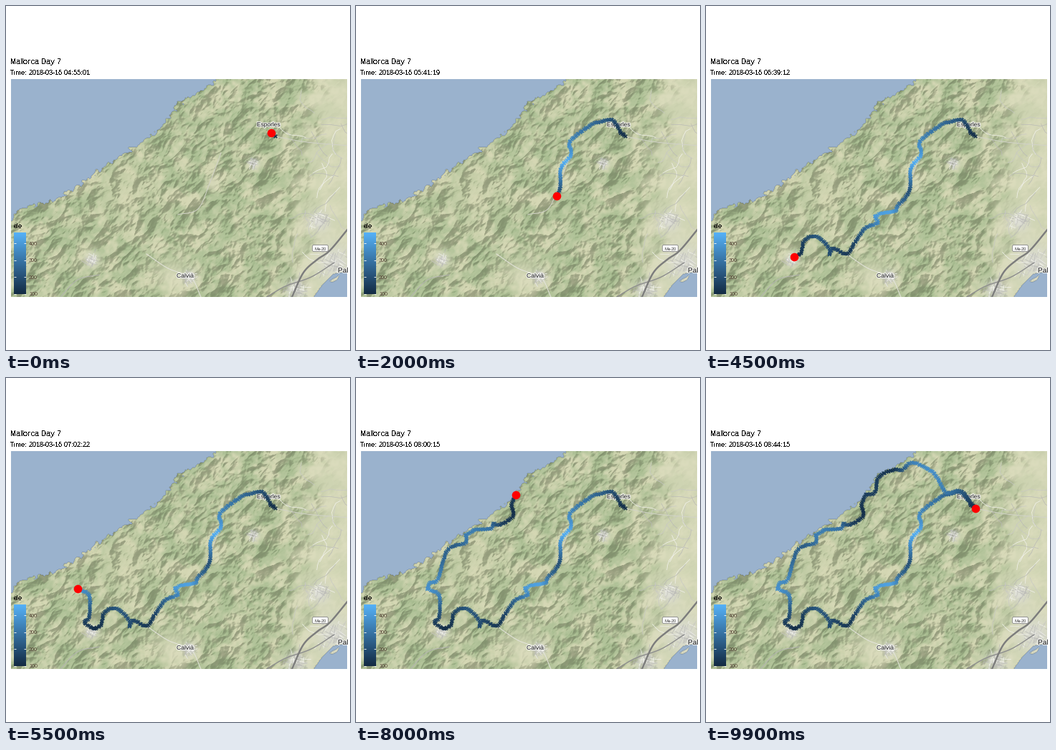
Write a matplotlib script that moves like this. It is 480 px wide and 480 px high and loops after 10 s.

```python
import matplotlib.pyplot as plt
import numpy as np
from matplotlib import patheffects
from matplotlib.animation import FuncAnimation
from matplotlib.collections import LineCollection
from matplotlib.colors import LinearSegmentedColormap
from matplotlib.patches import FancyBboxPatch, Rectangle
from matplotlib.path import Path

FRAMES, INTERVAL = 100, 100
PT = 0.9  # points per pixel at 80 dpi
LEFT, RIGHT, TOP, BOTTOM = 7, 476, 102, 406
START, DURATION = 4 * 3600 + 55 * 60 + 1, 13754
EFFORT = 0.07  # how strongly a climb slows the rider

rng = np.random.default_rng(16)
X, Y = np.meshgrid(np.arange(LEFT, RIGHT) + 0.5, np.arange(TOP, BOTTOM) + 0.5)

COAST = [(0, 308), (22, 281), (66, 272), (104, 249), (130, 229), (170, 203), (200, 184),
         (223, 162), (240, 136), (275, 117), (297, 101), (297, 60), (0, 60)]
BAY = [(425, 412), (440, 391), (457, 374), (485, 368), (485, 412)]
SPIT = [(451, 384), (465, 376), (462, 382), (456, 385)]
VALLEYS = [(232, 374, 28), (120, 354, 15), (288, 248, 10)]
TOWNS = [(458, 358, 24), (437, 300, 14), (120, 354, 8), (346, 219, 7), (256, 378, 9),
         (405, 397, 15)]


def spline(points, step=2.2):
    """Smooth curve through the points, resampled at an even spacing."""
    p = np.array(points, float)
    p = np.vstack([2 * p[0] - p[1], p, 2 * p[-1] - p[-2]])
    u = np.linspace(0, 1, 20)[:, None]
    xy = np.vstack([
        b + u / 2 * (c - a + u * (2 * a - 5 * b + 4 * c - d + u * (3 * (b - c) + d - a)))
        for a, b, c, d in zip(p, p[1:], p[2:], p[3:])])
    s = np.r_[0, np.cumsum(np.hypot(*np.diff(xy, axis=0).T))]
    v = np.linspace(0, s[-1], max(round(s[-1] / step), 2) + 1)
    return np.c_[np.interp(v, s, xy[:, 0]), np.interp(v, s, xy[:, 1])]


# Terrain

def field(wavelength, stretch=1.0):
    """Random waves of one scale, drawn out along the south-west to north-east axis."""
    h, w = X.shape
    fy, fx = np.fft.fftfreq(h)[:, None], np.fft.rfftfreq(w)[None]
    f = np.hypot((fx - fy) * stretch, fx + fy) / np.sqrt(2)
    gain = np.exp(-2 * np.log(np.maximum(f, 1e-4) * wavelength) ** 2)
    n = np.fft.irfft2(np.fft.rfft2(rng.normal(size=X.shape)) * gain, s=X.shape)
    return n / n.std()


def blobs(spots):
    total = sum(np.exp(-((X - x) ** 2 + (Y - y) ** 2) / r ** 2) for x, y, r in spots)
    return np.clip(total, 0, 1)


def inside(poly, x, y):
    return Path(poly).contains_points(np.c_[x.ravel(), y.ravel()]).reshape(x.shape)


def mix(base, color, amount):
    return base + (np.array(color) - base) * amount[..., None]


def terrain():
    plain = 1 / (1 + np.exp(-(X + 0.1 * (Y - 250) - 412 + 9 * field(50)) / 9))
    flat = np.clip(plain + blobs(VALLEYS), 0, 1)

    height = sum(-a * np.abs(field(w, 1.3))
                 for w, a in [(80, 1.0), (40, 0.55), (20, 0.26), (10, 0.09)])
    gy, gx = np.gradient(height)
    slope = gx + gy
    slope = np.tanh(slope / slope.std()) * (1 - 0.95 * flat)

    trees = np.clip(0.6 + 0.35 * field(60) + 0.15 * field(15), 0, 1) * (1 - 0.8 * flat)
    trees *= 1 - 0.7 * blobs([(165, 260, 40)])
    rgb = np.ones(X.shape + (3,)) * (209, 212, 176)
    rgb = mix(rgb, (219, 220, 189), flat)
    rgb = mix(rgb, (166, 187, 143), trees)
    rgb = mix(rgb, (222, 222, 217), 0.85 * blobs(TOWNS))
    rgb = mix(rgb, (88, 96, 72), 0.45 * np.clip(-slope, 0, 1))
    rgb = mix(rgb, (232, 232, 202), 0.22 * np.clip(slope, 0, 1))

    sea = inside(COAST, X + 1.6 * field(12), Y + 1.6 * field(12)) | inside(BAY, X, Y)
    sea &= ~inside(SPIT, X, Y)
    rgb[sea] = (154, 178, 205)
    edge = np.hypot(*np.gradient(sea.astype(float))) > 0
    rgb[edge] *= 0.9
    return np.clip(rgb, 0, 255).astype(np.uint8), sea


def streets():
    """Short crossing lanes in each town and long wandering ones over the plain."""
    lanes = []
    for cx, cy, r in TOWNS:
        tilt = rng.uniform(0, np.pi)
        for _ in range(int(r * 3)):
            a = tilt + rng.integers(2) * np.pi / 2 + rng.normal(0, 0.15)
            mid = rng.normal((cx, cy), r * 0.5)
            half = rng.uniform(2, 7) * np.array([np.cos(a), np.sin(a)])
            lanes.append([mid - half, mid + half])
    for _ in range(26):
        start = rng.uniform((405, 150), (476, 340))
        turn = rng.uniform(0, 2 * np.pi) + np.cumsum(rng.normal(0, 0.35, 7))
        walk = 7 * np.c_[np.cos(turn), np.sin(turn)]
        lanes.append(start + np.cumsum(walk, axis=0))
    return [lane for lane in lanes if not inside(BAY, *np.transpose(lane)).any()]


# Ride

def ride():
    """Samples (time, x, y, elevation) along the whole route."""
    samples = []
    here, now = (376, 182), -1

    def leg(end, heights, *points):
        nonlocal here, now
        xy = spline([here, *points])
        s = np.linspace(0, 1, len(xy))
        ele = np.interp(s, np.linspace(0, 1, len(heights)), heights)
        cost = np.r_[0, np.cumsum(np.exp(EFFORT * np.diff(ele) / 2.2))]
        samples.append(np.c_[now + (end - now) * cost / cost[-1], xy, ele])
        here, now = points[-1], end

    leg(0, (110, 120), (370, 177))
    leg(12, (120, 200, 270, 310, 380), (360, 161), (354, 158), (341, 162), (333, 163),
        (315, 175), (301, 186), (297, 193), (300, 200))
    leg(29, (370, 460, 340, 200, 260, 420, 400), (299, 210), (286, 226), (284, 258),
        (267, 280), (265, 286), (244, 290), (236, 294))
    leg(45, (400, 280, 190, 130, 170, 200, 215, 150, 105), (239, 303), (222, 310),
        (207, 331), (196, 346), (178, 338), (172, 347), (172, 338), (154, 322),
        (137, 327), (133, 344), (123, 350))
    leg(55, (105, 150, 220, 330, 375), (109, 341), (116, 333), (116, 304), (100, 294))
    leg(64, (375, 340, 260, 230, 320), (103, 286), (114, 281), (125, 245), (135, 235),
        (153, 230), (153, 220))
    leg(66, (320, 320), (165, 212))
    leg(80, (320, 290, 140, 110, 150), (188, 210), (192, 203), (200, 205), (219, 193),
        (217, 176), (223, 163))
    leg(99, (150, 150, 120, 330, 370, 330, 230, 110), (236, 159), (241, 138), (262, 128),
        (274, 128), (289, 118), (318, 133), (335, 160), (354, 158), (376, 182))
    return np.vstack(samples).T


when, px, py, ele = ride()
marks = np.c_[px, py] + rng.uniform(-0.6, 0.6, (len(px), 2))
blues = LinearSegmentedColormap.from_list("blues", ["#132B43", "#56B1F7"])

plt.rcParams.update({"font.family": "Liberation Sans", "text.hinting": "native",
                     "text.hinting_factor": 1})
fig = plt.figure(figsize=(6, 6), dpi=80, facecolor="white")
ax = fig.add_axes([0, 0, 1, 1])
ax.axis("off")

land, sea = terrain()
ax.imshow(land, extent=(LEFT, RIGHT, BOTTOM, TOP), aspect="auto",
          interpolation="nearest", zorder=1)
ax.imshow(np.linspace(1, 0, 86)[:, None], cmap=blues, extent=(11, 28, 402, 316),
          aspect="auto", zorder=8)
ax.set(xlim=(0, 480), ylim=(480, 0))
window = Rectangle((LEFT, TOP), RIGHT - LEFT, BOTTOM - TOP, transform=ax.transData)


def road(color, width, *points):
    line, = ax.plot(*spline(points).T, color=color, lw=width * PT, zorder=3)
    line.set_clip_path(window)


def label(x, y, text, size, color="black", **kw):
    return ax.text(x, y, text, fontsize=size * PT, color=color, va="baseline", zorder=9, **kw)


def place(x, y, name, size, **kw):
    t = label(x, y, name, size, "#222222", **kw)
    t.set(zorder=4, clip_path=window)
    t.set_path_effects([patheffects.withStroke(linewidth=2, foreground="#ffffffcc")])


lanes = LineCollection(streets(), colors=["#f4f4f0", "#b9b9b6", "#c8c8c4"],
                       linewidths=0.6, zorder=2)
ax.add_collection(lanes)
lanes.set_clip_path(window)

road("#d2d3c8", 1, (376, 182), (420, 190), (480, 195))
road("#d2d3c8", 1, (300, 205), (285, 245), (268, 283), (240, 291))
road("#e4e4dc", 1, (196, 346), (226, 366), (258, 379), (272, 406))
road("#b4b4b0", 1, (76, 406), (100, 382), (130, 375))
road("#8d8d8d", 1.4, (364, 406), (390, 391), (426, 378), (458, 358))
road("#7c7c7c", 2.4, (399, 406), (415, 372), (434, 354), (452, 341), (478, 310))

ax.add_patch(FancyBboxPatch((428.5, 334.5), 20, 7, boxstyle="round,pad=1,rounding_size=2",
                            fc="white", ec="#8a8a8a", lw=0.8, zorder=4))
label(438.5, 340.6, "Ma-20", 6, "#333333", ha="center")
place(365, 168, "Esporles", 8.4, ha="center")
place(251.5, 379, "Calvià", 8.6, ha="center")
place(463, 372, "Pal", 10)

label(6, 81, "Mallorca Day 7", 11, antialiased=False)
clock = label(6, 96, "", 9, antialiased=False)
label(11, 310, "ele", 9, antialiased=False)
for value in (100, 200, 300, 400):
    y = 401.5 - (value - 100) * 0.235
    for x in (11, 24.6):
        ax.plot([x, x + 3.4], [y, y], color="white", lw=0.8, zorder=9,
                solid_capstyle="butt")
    label(32, y + 2.6, str(value), 7, "#4d3a2e")

trail = ax.scatter([], [], c=[], marker="x", s=(4.4 * PT) ** 2, linewidths=1.6 * PT,
                   cmap=blues, vmin=97, vmax=462, zorder=6)
dot, = ax.plot([], [], "o", color="red", ms=11.6 * PT, mew=0, zorder=7)


def draw(i):
    n = np.searchsorted(when, i, side="right")
    trail.set_offsets(marks[:n])
    trail.set_array(ele[:n])
    dot.set_data([np.interp(i, when, px)], [np.interp(i, when, py)])
    now = START + DURATION * i // (FRAMES - 1)
    clock.set_text(f"Time: 2018-03-16 {now // 3600:02d}:{now // 60 % 60:02d}:{now % 60:02d}")
    return trail, dot, clock


anim = FuncAnimation(fig, draw, frames=FRAMES, interval=INTERVAL, repeat=True, repeat_delay=0)
plt.show()
```
